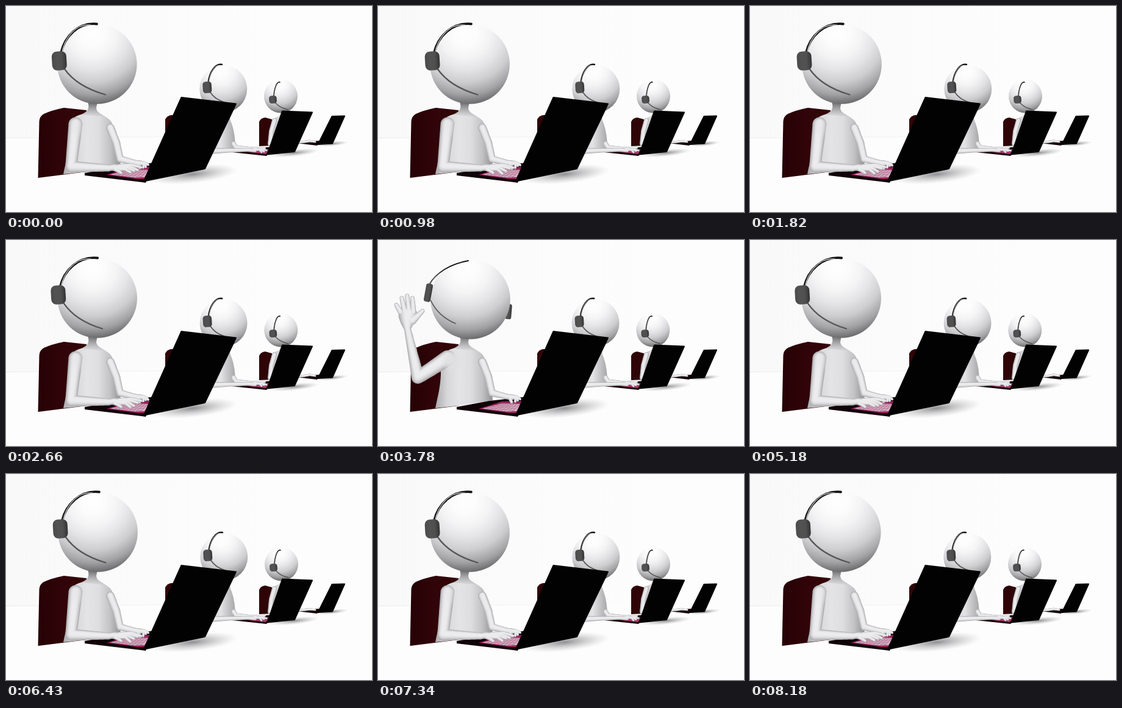
An HTML page with a canvas for the animation above (8.25 s loop, 600 px wide and 338 px high).

```html
<!DOCTYPE html>
<html lang="en">
<head>
<meta charset="utf-8">
<title>Call centre</title>
<style>
html, body { margin: 0; width: 100%; height: 100%; overflow: hidden; background: #fdfdfd; }
canvas { display: block; width: 600px; height: 338px; }
</style>
</head>
<body>
<canvas id="stage" width="600" height="338"></canvas>
<script>
const ctx = document.getElementById('stage').getContext('2d');
const LOOP = 8250, STEP = 70, HOLD = 5320, BACK = 5730;
const rad = Math.PI / 180;

const mix = (a, b, k) => a + (b - a) * k;
const mixAll = (a, b, k) => a.map((v, i) => mix(v, b[i], k));
const ease = (a, b, t) => {
  const k = Math.min(1, Math.max(0, (t - a) / (b - a)));
  return k * k * (3 - 2 * k);
};
const polar = ([x, y], angle, len) => [x + Math.cos(angle) * len, y + Math.sin(angle) * len];

// The story runs forward, rests, then its opening plays backward.
function storyTime(ms) {
  const t = ms % LOOP;
  if (t < BACK) return Math.min(HOLD, Math.floor(t / STEP) * STEP);
  return 2450 - Math.floor((t - BACK) / STEP) * STEP;
}

function pose(t) {
  const raise = ease(2700, 3240, t) * (1 - ease(4460, 5040, t));
  return {
    raise,
    sway: Math.sin((t - 3780) / 560 * Math.PI * 2) * 6 * rad * raise,
    lean: ease(0, 900, t),
    turn: ease(1750, 2600, t),
    tap: i => Math.sin(t / 64 + i * 1.8) * (1 - raise)
  };
}

// Evenly spaced colour stops.
function blend(g, ...colors) {
  colors.forEach((c, i) => g.addColorStop(i / (colors.length - 1), c));
  return g;
}
const across = (x0, x1, ...colors) => blend(ctx.createLinearGradient(x0, 0, x1, 0), ...colors);

function shape(fill, d) {
  ctx.fillStyle = fill;
  ctx.fill(new Path2D(d));
}

// Curve between two points; the bends are fractions of the span.
function bend(color, width, x, y, dx, dy, [ax, ay, bx, by]) {
  ctx.beginPath();
  ctx.moveTo(x, y);
  ctx.bezierCurveTo(x + dx * ax, y + dy * ay, x + dx * bx, y + dy * by, x + dx, y + dy);
  ctx.strokeStyle = color;
  ctx.lineWidth = width;
  ctx.stroke();
}

// Fused tapering limbs, each a chain of [x, y, radius], shaded from rim to core.
function limbs(...chains) {
  const layers = 8;
  for (let l = 0; l < layers; l++) {
    const scale = 1 - l * 0.11;
    const tone = Math.round(236 - 62 * (1 - l / (layers - 1)) ** 2);
    ctx.beginPath();
    for (const chain of chains) {
      for (let i = 1; i < chain.length; i++) {
        const a = chain[i - 1], b = chain[i];
        const n = Math.ceil(Math.hypot(b[0] - a[0], b[1] - a[1])) || 1;
        for (let j = 0; j <= n; j++) {
          const [x, y, r] = mixAll(a, b, j / n);
          const lift = r * (1 - scale) * 0.3;
          ctx.moveTo(x + r * scale, y - lift);
          ctx.arc(x, y - lift, r * scale, 0, 7);
        }
      }
    }
    ctx.fillStyle = `rgb(${tone},${tone},${tone + 2})`;
    ctx.fill();
  }
}

function ball(x, y, r) {
  const gx = x - r * 0.12, gy = y - r * 0.78;
  ctx.beginPath();
  ctx.arc(x, y, r, 0, 7);
  ctx.fillStyle = blend(ctx.createRadialGradient(gx, gy, 0, gx, gy, r * 1.85),
    '#fefefe', '#fcfcfc', '#f4f4f5', '#e4e4e7', '#cdcdd0', '#a2a2a4', '#5c5c5e');
  ctx.fill();
}

function headset(x, y, w, h, top, mic, weight, turned = 0) {
  const bx = x + w * 0.12, by = y - h * 0.42;
  const arc = mixAll([0.1, 0.56, 0.48, 1.07], [0.16, 0.5, 0.55, 0.88], turned);
  bend('#141414', weight, bx, by, top[0] - bx, top[1] - by, arc);
  bend('rgba(250,250,250,.85)', weight * 0.3, bx + weight * 0.3, by + 1,
    (top[0] - bx) * 0.82, top[1] - by + weight * 0.2, arc);
  const mx = x + w * 0.35, my = y + h * 0.42;
  bend('#565656', 0.8 + weight * 0.4, mx, my, mic[0] - mx, mic[1] - my, [0.22, 0.5, 0.6, 0.82]);
  pad(x, y, w, h, mix(-0.06, 0.18, turned));
}

function pad(x, y, w, h, tilt) {
  ctx.save();
  ctx.translate(x, y);
  ctx.rotate(tilt);
  ctx.beginPath();
  ctx.roundRect(-w / 2, -h / 2, w, h, Math.min(w, h) * 0.34);
  ctx.fillStyle = across(-w / 2, w / 2, '#4a4a4a', '#525252', '#505050', '#333333');
  ctx.fill();
  ctx.restore();
}

function shadow(x, y, w, h) {
  ctx.save();
  ctx.translate(x, y);
  ctx.rotate(-0.1);
  ctx.scale(w, h);
  ctx.fillStyle = blend(ctx.createRadialGradient(0, 0, 0, 0, 0, 1),
    'rgba(70,70,74,.6)', 'rgba(110,110,114,.3)', 'rgba(150,150,154,0)');
  ctx.fillRect(-1, -1, 2, 2);
  ctx.restore();
}

function lid(d) {
  const p = new Path2D(d);
  ctx.fillStyle = ctx.strokeStyle = '#020202';
  ctx.lineWidth = 2;
  ctx.fill(p);
  ctx.stroke(p);
}

function room() {
  ctx.fillStyle = '#fdfdfd';
  ctx.fillRect(0, 0, 600, 338);
  shape(across(0, 450, '#f9f9fa', '#fbfbfc', '#fdfdfd'), 'M0 0 H600 V212 L250 214 L0 217 Z');
  shape(across(0, 420, '#ececee', '#f0f0f1', '#fdfdfd'), 'M0 216 L420 213 V214 L0 217 Z');
}

function farPerson(dx, { tap }) {
  shape('#2e0407', 'M415 230 V190 Q417 184 425 183 L436 186 L438 229 Z');
  shape(across(430, 468, '#b4b4b6', '#dedee0', '#c4c4c6'),
    'M452 174 Q451 180 442 183 Q436 186 434 206 L430 229 H468 V190 Q458 182 457 174 Z');
  limbs([[440, 188, 4], [435, 206, 4], [433, 226, 4]]);
  ball(450.5 + dx, 148, 27.5);
  headset(437.5 + dx, 153.5, 12.5, 13, [449 + dx, 125], [462 + dx, 170], 1.7);

  shadow(535, 226, 26, 4);
  shape('#140306', 'M476 225 L492 222 L516 221 L510 229 Z');
  limbs([[470, 224, 2.5], [488, 223, 2], [498, 221.5 + tap(0) * 0.4, 2], [507, 223, 1.4]]);
  lid('M534.5 181 L555 180.5 L535 225.5 L511.5 227 Z');
}

function midPerson(dx, { tap }) {
  shape('#2e0407', 'M261 230 V186 Q264 180 271 179 H300 V230 Z');
  shape(across(325, 378, '#c4c4c6', '#e4e4e6', '#a2a2a4'),
    'M357 166 L356 180 L330 190 L320 240 L376 234 Q376 210 370 193 Q366 186 366 166 Z');
  ball(356.3 + dx, 136, 39);
  headset(329.8 + dx, 133.5, 14.5, 19, [354 + dx, 96], [358 + dx, 158], 2.4);

  shadow(472, 241, 42, 6);
  shape('#140306', 'M361 239 L390 234 L440 231 L427 246 Z');
  shape('#a8396c', 'M392 239 L404 235 H432 L426 243 Z');
  limbs([[373, 226, 4], [377, 232, 3.5], [405, 234, 2.5], [424, 233 + tap(1) * 0.5, 2]]);
  const fingers = [0, 1, 2].map(i =>
    [[406, 236, 2], [415 + i * 3, 235.5, 1.8], [419 + i * 4, 240 - i * 1.5 + tap(i) * 0.5, 1.4]]);
  limbs([[334, 238, 5], [366, 237, 3.5], [397, 236, 3], [408, 237, 3]], ...fingers);
  lid('M453 172.5 L502 174.5 L473 239 L428.5 243.5 Z');
}

// Chains of [forward, side, radius] from the wrist, closed to open.
function handParts(open, tap) {
  const part = (a, b) => a.map((p, i) => mixAll(p, b[i], open));
  const parts = [
    part([[0, 0, 5], [8, -1, 5.5], [18, 0, 6]], [[0, 0, 6], [13, 0, 12], [21, 1, 15.5]]),
    part([[10, 2, 3.5], [14, 4, 2.8], [20, 8, 2.3]], [[12, 8, 7], [21, 18, 4.6], [28, 25, 3.4]])
  ];
  for (let i = 0; i < 4; i++) {
    const base = [17, -3 + i * 1.5], tip = [53 - i * 6, -1 + i * 3];
    const wideBase = [26, -11 + i * 7], wideTip = [53 - 3.8 * (i - 2) ** 2, -18 + i * 8.8];
    const [mx, my] = mixAll(base, tip, 0.55);
    const [wx, wy] = mixAll(wideBase, wideTip, 0.5);
    parts.push(part(
      [[...base, 3.5], [mx, my - 3, 2.8], [tip[0], tip[1] + tap(i) * 1.3, 2.2]],
      [[...wideBase, 4.6], [wx, wy, 4.1], [...wideTip, 3.5]]));
  }
  return parts;
}

function nearArm({ raise, sway, tap }) {
  const swing = (from, to) => mix(from, to, raise) * rad;
  const shoulder = [114, 194];
  const elbow = polar(shoulder, swing(96, 147), mix(70, 58, raise));
  const wrist = polar(elbow, swing(2, -102) + sway, mix(62, 83, raise));
  const angle = swing(0, -90) + sway * 1.3;
  const c = Math.cos(angle), s = Math.sin(angle);
  const hand = handParts(raise, tap).map(part => part.map(([u, v, r]) =>
    [wrist[0] + u * c - v * s, wrist[1] + u * s + v * c, r]));

  limbs([[...shoulder, mix(11.5, 13, raise)], [...elbow, mix(9.5, 10.5, raise)], [...wrist, 5.6]], ...hand);

  // Melts the shoulder into the body.
  ctx.fillStyle = blend(ctx.createRadialGradient(122, 198, 0, 122, 198, 19),
    'rgba(224,224,226,1)', 'rgba(224,224,226,.85)', 'rgba(224,224,226,0)');
  ctx.globalAlpha = mix(0.35, 1, raise);
  ctx.fillRect(103, 179, 38, 38);
  ctx.globalAlpha = 1;
}

function nearLaptop() {
  shadow(306, 276, 74, 15);
  shape('#100308', 'M129 274 L182 264 L245 257 L229 290 L222 289 L129 278 Z');
  shape('#97215b', 'M165 277 L203 265 L240 264 L230 284 L216 284 Z');
  shape('#d6b3c4', 'M171 276.5 L203 268 L235 269 L227 281 L212 281.5 Z');
  ctx.strokeStyle = 'rgba(135,35,85,.55)';
  ctx.lineWidth = 0.7;
  ctx.beginPath();
  for (let i = 0; i < 8; i++) {
    ctx.moveTo(177 + i * 6, 278 + i * 0.6);
    ctx.lineTo(201 + i * 4.5, 268 + i * 0.2);
    if (i % 2) continue;
    ctx.moveTo(177 + i * 4, 275 - i);
    ctx.lineTo(224 + i * 1.5, 280 - i * 1.5);
  }
  ctx.stroke();
}

function nearPerson(p) {
  const { raise, lean, turn, tap } = p;
  shape(across(53, 132, '#260205', '#300408', '#340509'),
    'M52.5 282 L54.5 189 Q55 181 62 177 Q75 171 95 167 L132 171 V272 Z');
  shape(across(95, 190, '#aeaeb0', '#d8d8da', '#e4e4e6', '#dedee0', '#c2c2c4', '#8a8a8c'),
    'M134 157 C138 169 133 174 123 178 C104 183 103 195 103 220 C102 245 97 260 94 276 L130 272 L188 263 ' +
    'C187 235 182 205 172 189 C165 180 148 176 148 167 L150 157 Z');
  shape(blend(ctx.createLinearGradient(0, 158, 0, 184), 'rgba(40,40,42,.65)', 'rgba(120,120,122,0)'),
    'M134 157 C138 169 133 174 123 178 L163 182 C157 178 148 175 148 167 L150 157 Z');

  if (raise > 0) pad(mix(202, 214, raise), 117.5, 10, 25, 0.08);
  const hx = lean * 1.3 - turn * 0.9, px = lean * 1.8 - turn * 3.3, mx = lean * 0.5 - turn * 5.5;
  ball(mix(149.3 + hx, 151.5, raise), mix(95.5, 97.5, raise), 65.3);
  const [x, y, w, h, weight] = mixAll([87.3 + px, 90, 24, 31, 3.8], [82.5, 86.5, 11, 30, 2], raise);
  headset(x, y, w, h, mixAll([149 + hx * 3, 29.5], [148, 34], raise),
    mixAll([163 + mx, 145.5], [127, 137], raise), weight, raise);

  nearLaptop();
  const fingers = [0, 1, 2].map(i =>
    [[218, 258, 3.5], [226 + i * 2, 257 + i, 2.5], [225 + i * 4, 265 - i * 2 + tap(i), 2]]);
  limbs([[171, 200, 7], [181, 225, 6.5], [187, 251, 6], [211, 257, 4.5], [220, 258, 4.5]],
    [[216, 259, 3], [219, 266 + tap(3) * 0.6, 2.4]], ...fingers);
  nearArm(p);
  lid('M287.5 150 L377 160.5 L326 267 L226 287.5 Z');
}

function draw(ms) {
  const p = pose(storyTime(ms));
  const dx = p.lean - p.turn * 0.7;
  ctx.lineCap = ctx.lineJoin = 'round';
  room();
  farPerson(dx, p);
  midPerson(dx, p);
  nearPerson(p);
}

let start;
function tick(now) {
  start ??= now;
  draw(now - start);
  requestAnimationFrame(tick);
}
draw(0);
requestAnimationFrame(tick);
</script>
</body>
</html>
```
